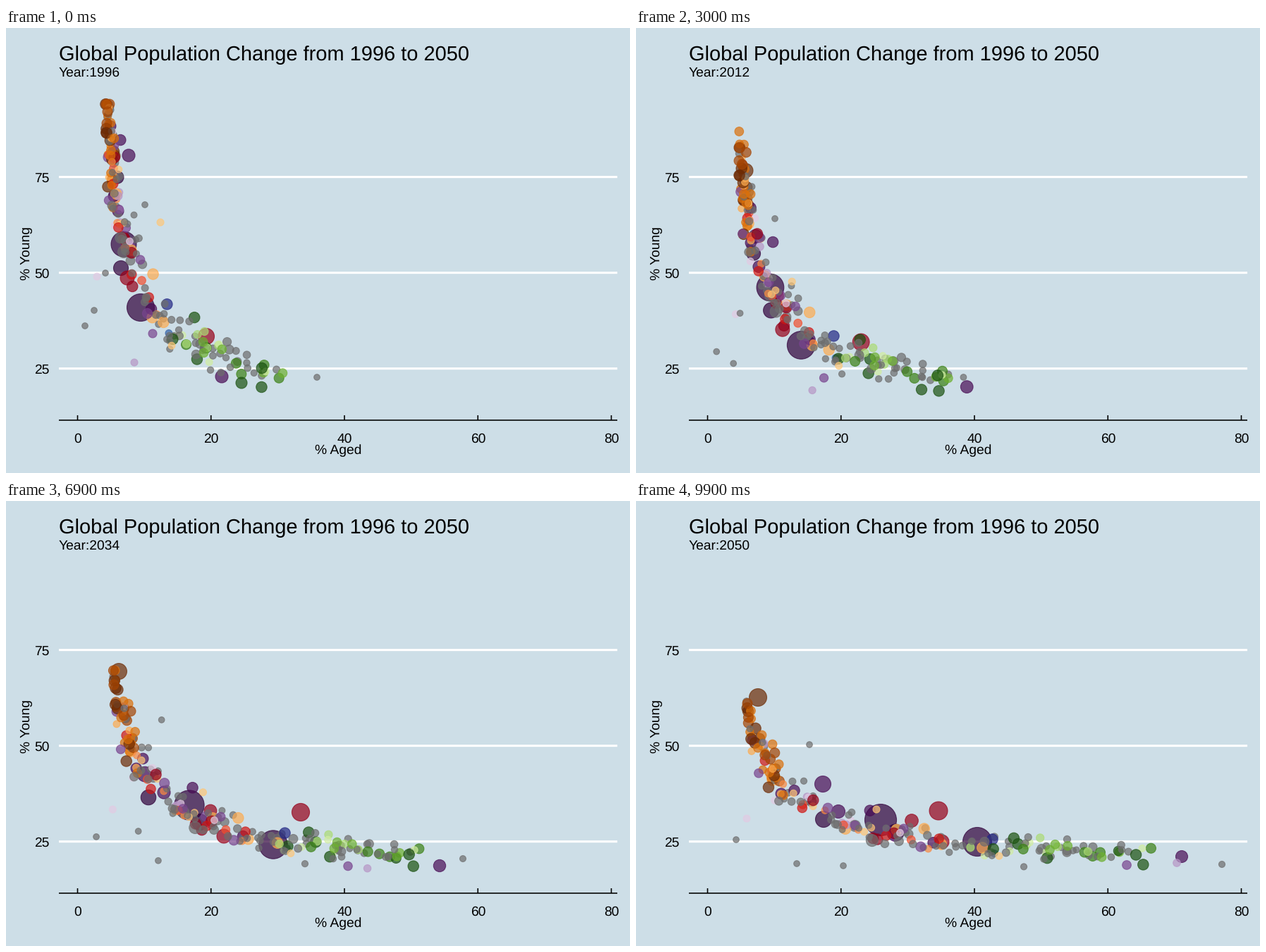
These frames come from a looping animation (885 px wide and 632 px high, 10 s). A matplotlib script:

```python
import numpy as np
import matplotlib.pyplot as plt
from matplotlib.animation import FuncAnimation
from matplotlib.colors import to_rgb

W, H, DPI = 885, 632, 100
PT = 72 / DPI
FRAMES, INTERVAL = 100, 100
FIRST, LAST = 1996, 2050
P = np.linspace(0, 1, FRAMES)
KEYS = {3: (0, 0.414, 1), 4: (0, 0.414, 0.697, 1)}

plt.rcParams["font.family"] = "Liberation Sans"
plt.rcParams["text.hinting"] = "none"
rng = np.random.default_rng(11)


def shade(code):
    return np.array(to_rgb("#" + code)) ** 1.222


def ramp(codes):
    return [shade(c) for c in codes.split()]


BG = shade("d5e4eb")
ORANGES = ramp("7f3b08 b35806 e08214 e08214 fdb863")
CREAMS = ramp("fdb863 fed08a")
REDS = ramp("a50026 d7221f f4613f f99a55")
PURPLES = ramp("5b1567 8a559e 8a559e c2a5cf e7d4e8")
GREENS = ramp("276419 4d9221 7fbc41 b8e186 d9f0b0")
BLUES = ramp("313695 4575b4")
DEEP, GREY = shade("40004b"), shade("7f7f7f")
BROWN, CRIMSON, PLUM, FOREST = ORANGES[0], REDS[0], PURPLES[0], GREENS[0]


def px(aged):
    return 101.5 + 9.4625 * aged


def py(young):
    return 619.7 - 5.442 * young


def mover(colour, r0, r1, *points):
    """Bubble gliding between a few key points in pixels."""
    xy = [np.interp(P, KEYS[len(points)], c) for c in zip(*points)]
    return colour, r0 + (r1 - r0) * P, np.column_stack(xy)


def country(colour, radius, stage):
    """Country ageing along young = a + b / aged; a late stage is an old society."""
    start = (4.7 + 17 * stage ** 2) * rng.uniform(0.88, 1.15)
    end = (5.5 + 48 * stage) * rng.uniform(0.92, 1.1)
    aged = start + (end - start) * P ** 1.4
    spread = np.exp(rng.normal(0, 0.11))
    young = 12 + 6 * P + (340 - 100 * P) / aged * spread + rng.normal(0, 1.5)
    xy = np.column_stack([px(aged), py(np.minimum(young, 94 - 8 * P))])
    return colour, np.full(FRAMES, radius), xy


def family(colours, count, low, high):
    """Spread countries over a range of stages; darker shades are larger."""
    stages = rng.permutation(np.linspace(low, high, count))
    steps = max(len(colours) - 1, 1)
    return [country(colours[k % len(colours)], 8.2 - 2.8 * (k % len(colours)) / steps, s)
            for k, s in enumerate(stages)]


giants = [
    mover(DEEP, 18.5, 23, (167, 307), (199, 391), (260, 432), (347, 453)),
    mover(DEEP, 20, 21, (191, 397), (250, 470), (379, 488), (484, 484)),
    mover(CRIMSON, 12, 13.5, (284, 438), (332, 449), (418, 442), (429, 440)),
    mover(BROWN, 9.5, 13, (153, 182), (157, 210), (160, 242), (173, 279)),
    mover(DEEP, 11, 12.5, (163, 341), (202, 423), (275, 456), (368, 471)),
    mover(CRIMSON, 10.5, 10.5, (172, 355), (221, 455), (309, 476), (434, 484)),
    mover(PLUM, 9.5, 9, (306, 495), (529, 515), (615, 518), (774, 505)),
    mover(PLUM, 9.5, 12, (174, 181), (168, 338), (197, 388), (265, 402)),
    mover(DEEP, 9.5, 12, (158, 212), (170, 360), (202, 421), (266, 452)),
    mover(PLUM, 8.5, 10, (159, 260), (180, 368), (224, 414), (287, 441)),
    mover(CRIMSON, 8.5, 9.8, (168, 300), (213, 410), (290, 440), (391, 454)),
]

# countries far from the common curve
stragglers = [
    mover(GREY, 4.8, 5, (441, 496), (473, 496), (648, 508), (831, 516)),
    mover(GREY, 4.8, 4.8, (112, 423), (115, 473), (142, 481)),
    mover(GREY, 4.8, 4.8, (125, 401), (143, 504), (294, 518)),
    mover(GREY, 4.8, 4.8, (141, 348), (150, 426), (228, 515)),
    mover(GREY, 4.8, 4.8, (197, 251), (197, 278), (246, 346)),
    mover(PURPLES[-1], 5.5, 5.5, (129, 353), (146, 426), (157, 451)),
    mover(PURPLES[3], 5.5, 5.8, (182, 475), (275, 529), (767, 514)),
    mover(PURPLES[1], 6.5, 6.8, (208, 434), (288, 520), (696, 517)),
    mover(CREAMS[1], 5.5, 5.5, (219, 276), (222, 391), (341, 438)),
    mover(FOREST, 8.5, 7.2, (334, 504), (431, 517), (684, 497)),
]

others = (
    stragglers
    + family(ORANGES, 40, 0, 0.12)
    + family(CREAMS, 12, 0.02, 0.75)
    + family(REDS, 16, 0.05, 0.6)
    + family(PURPLES, 20, 0.02, 0.55)
    + family(GREENS, 26, 0.75, 1.2)
    + family(BLUES, 2, 0.7, 0.78)
    + [country(GREY, min(4.9 + rng.exponential(0.7), 9.5), s) for s in np.linspace(0, 1.15, 84)]
)
bubbles = giants + [others[i] for i in rng.permutation(len(others))]
colours = [(*c, 0.7) for c, _, _ in bubbles]
radii = np.array([r for _, r, _ in bubbles])
places = np.array([xy for _, _, xy in bubbles])

fig = plt.figure(figsize=(W / 100, H / 100), dpi=DPI, facecolor=BG)
ax = fig.add_axes([0, 0, 1, 1])
ax.set(xlim=(0, W), ylim=(H, 0))
ax.axis("off")


def label(x, y, text, size=19.3, ha="left", **kw):
    return ax.text(x, y, text, fontsize=size * PT, ha=ha, va="baseline", color="black", **kw)


def line(xs, ys, colour, width):
    ax.plot(xs, ys, color=colour, lw=width * PT, solid_capstyle="butt", snap=False, zorder=1)


for v in (25, 50, 75):
    line((75, 867), (py(v), py(v)), "white", 3.1)
    label(61.3, py(v) + 7, str(v), ha="right")
line((75, 867), (557, 557), "black", 1.6)
for v in range(0, 81, 20):
    line((px(v), px(v)), (550, 557), "black", 1.6)
    label(px(v), 589, str(v), ha="center")
label(75, 45.5, "Global Population Change from 1996 to 2050", 29)
label(471, 605, "% Aged", ha="center")
label(34, 319.5, "% Young", ha="center", rotation=90, rotation_mode="anchor")
year = label(75, 68.5, "")

dots = ax.scatter(places[:, 0, 0], places[:, 0, 1], s=1, facecolors=colours,
                  edgecolors=colours, linewidths=1.1 * PT, zorder=2)


def update(i):
    dots.set_offsets(places[:, i])
    dots.set_sizes((2 * (radii[:, i] - 0.5) * PT) ** 2)
    year.set_text(f"Year:{round(FIRST + (LAST - FIRST) * P[i])}")
    return dots, year


anim = FuncAnimation(fig, update, frames=FRAMES, init_func=lambda: update(0),
                     interval=INTERVAL, repeat=True, repeat_delay=0)
plt.show()
```
